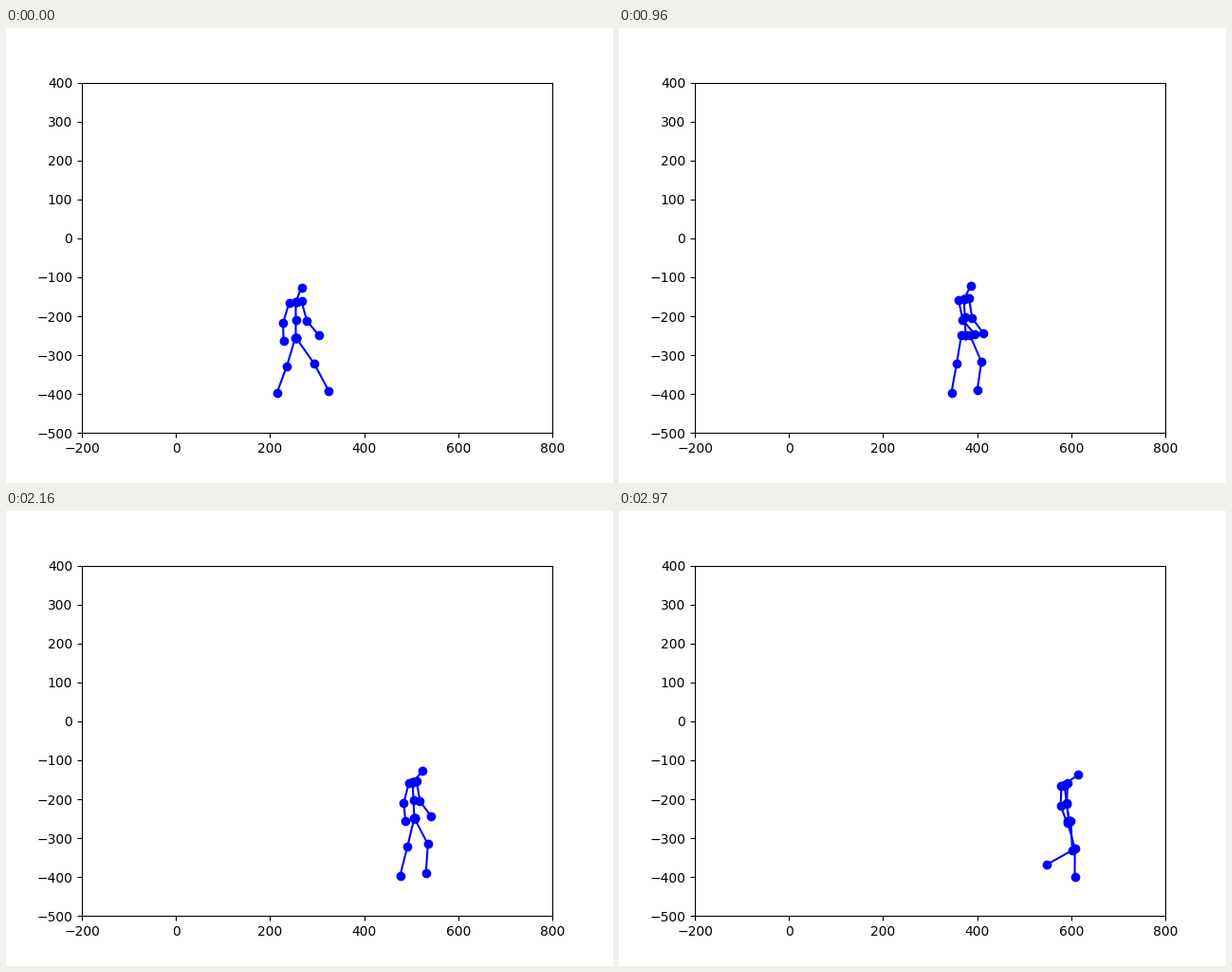
Recreate the animation shown at these times as a matplotlib script. Size 640 by 480 pixels, loop 3000 ms.

```python
import numpy as np
import matplotlib.pyplot as plt
from matplotlib.animation import FuncAnimation

FRAMES, STEP = 100, 30
W, H = 640, 480
CYCLE = 2400          # two steps, in ms
STRIDE = 130          # distance one foot covers per cycle, in pixels

# Walker's progress: time (ms) and pelvis x (px)
ROOT_T = [0, 510, 960, 1650, 2160, 2430, 2970]
ROOT_X = [306, 343, 366, 409, 431, 444, 475]


def wave(t, period, lead=0):
    return np.cos(2 * np.pi * (t / period + lead))


def bump(t, centre, width):
    """Soft peak that recurs every cycle."""
    d = (t - centre + CYCLE / 2) % CYCLE - CYCLE / 2
    return np.exp(-(d / width) ** 2)


def limb(start, length, angle):
    """End of a bone hanging from start; positive angles swing forward."""
    return start + length * np.array([np.sin(angle), np.cos(angle)])


def foot(t, x):
    """Ankle that stands at x, then eases one stride ahead each cycle."""
    n, local = divmod(t, CYCLE)
    s = np.clip((local - 130) / 1290, 0, 1)
    lift = (13.5 * bump(t, 530, 260) + 4.5 * bump(t, 1080, 220)
            + 2 * bump(t, 2200, 250))
    return np.array([x + STRIDE * (n + s * s * (3 - 2 * s)), 387 - lift])


def knee(t, hip, ankle):
    """Midpoint of the leg, pushed forward as the leg bends."""
    dx, dy = ankle - hip
    bend = 17 * bump(t, 640, 380) + 4.5 * bump(t, 1700, 250)
    return (hip + ankle) / 2 + bend * np.array([dy, -dx]) / np.hypot(dx, dy)


def leg(t, pelvis, hip, x):
    ankle = foot(t, x)
    return pelvis, hip, knee(t, hip, ankle), ankle


def arm(neck, offset, upper, fore):
    shoulder = neck + offset
    elbow = limb(shoulder, 21.5, upper)
    return neck, shoulder, elbow, limb(elbow, 19.5, fore)


def pose(t):
    """Joint chains in stage pixels at time t."""
    u = t / (FRAMES * STEP)
    half = CYCLE / 2
    swing, pace = wave(t, CYCLE), wave(t, half)

    pelvis = np.array([np.interp(t, ROOT_T, ROOT_X),
                       327.2 + 3 * wave(t, half, -0.22)])
    neck = pelvis + [2.5 * pace - 2.5, -38]
    head = neck + [6 + 9 * u * u, 5 * u - 15.5]
    twist = np.array([2.2 - 2.8 * swing, 0])

    return [
        (head, neck, (neck + pelvis) / 2, pelvis),
        arm(neck, [4 * u - 7, 1], -0.02 - 0.28 * swing, 0.4 - 0.38 * swing),
        arm(neck, [6 - 2.5 * u, -1.2], 0.11 + 0.16 * pace,
            0.42 + 0.3 * wave(t, half, 0.08)),
        leg(t, pelvis, pelvis + twist, 286),
        leg(t - half, pelvis, pelvis - twist, 286 + STRIDE / 2),
    ]


def to_data(points):
    x, y = np.transpose(points) - 0.5
    return (x - 80) / 496 * 1000 - 200, 400 - (y - 57.6) / 369.6 * 900


fig, ax = plt.subplots(figsize=(W / 100, H / 100), dpi=100)
ax.set_xlim(-200, 800)
ax.set_ylim(-500, 400)
lines = [ax.plot([], [], "bo-")[0] for _ in pose(0)]


def draw(i):
    for line, chain in zip(lines, pose(i * STEP)):
        line.set_data(*to_data(chain))
    return lines


anim = FuncAnimation(fig, draw, frames=FRAMES, interval=STEP, repeat=True,
                     repeat_delay=0)
plt.show()
```
